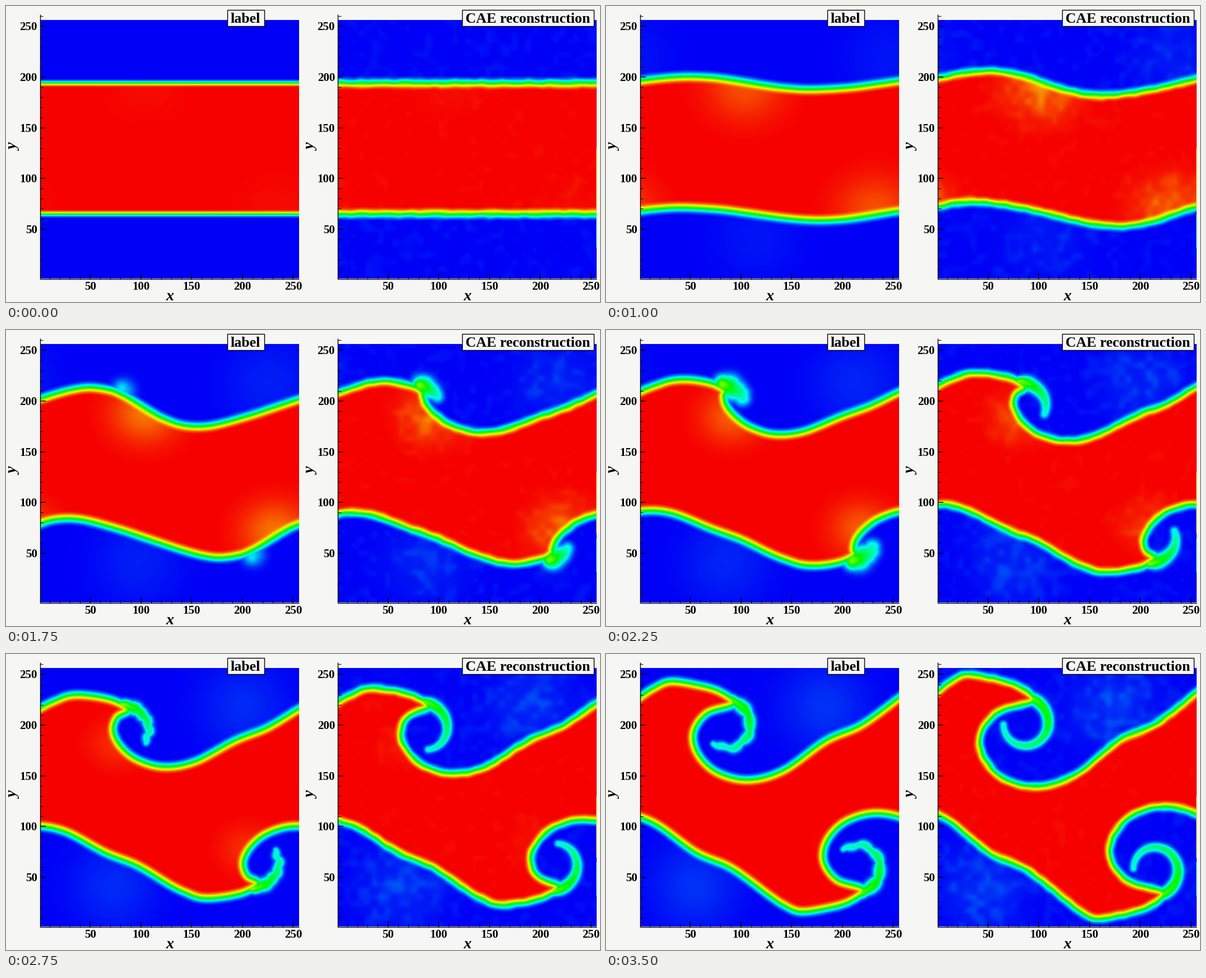
A matplotlib script that plays this animation: 1060x529 px, repeating every 3.75 s.

```python
import numpy as np
import matplotlib.pyplot as plt
from matplotlib.animation import FuncAnimation
from matplotlib.colors import LinearSegmentedColormap
from matplotlib.patches import Rectangle
from matplotlib.path import Path

W, H, DPI = 1060, 529, 100
PT = 72 / DPI
FRAMES, STEP = 15, 250
PAPER = "#f6f6f4"
UNIT = 1.8115                 # pixels per data unit
X0, Y0 = 59.5, 489.3          # pixel position of the data origin
PERIOD = 256 * UNIT
SHIFT = 531.5                 # offset of the right panel
TOP, BOTTOM = 22.0, 489.0     # the lower layer mirrors the upper one in here
NX, NY = 232, 234
ROLL, END = 1750, 3900        # ages at which roll-up begins and ends

F = 0.965
rainbow = LinearSegmentedColormap.from_list(
    "rainbow5", [(0, 0, F), (0, F, F), (0, F, 0), (F, F, 0), (F, 0, 0)], N=512)

gx = (X0 + (np.arange(NX) + 0.5) * PERIOD / NX).astype(np.float32)
gy = (TOP + (np.arange(NY) + 0.5) * (BOTTOM - TOP) / NY).astype(np.float32)
GX, GY = np.meshgrid(gx, gy)
GRID = np.column_stack([GX.ravel(), GY.ravel()])

# Key points on the upper layer: x on the wave, then x and y when rolled up.
KNOTS = np.array([
    (59.5, 59.5, 68), (90, 83, 50), (120, 112, 37), (150, 158, 44),       # crest
    (185, 205, 58), (206, 232, 84),                                       # neck
    (222, 170, 103), (238, 137, 143), (258, 142, 187), (282, 178, 224),   # vortex
    (318, 238, 238), (365, 305, 217), (430, 383, 156), (480, 450, 125)])  # trough, rise


def wave(x, age):
    """Growing sine whose falling side steepens."""
    g = min(age / ROLL, 1) ** 2
    th = 2 * np.pi * (x - X0) / PERIOD
    return 138.6 - 35 * g * np.sin(th + 0.3 + 0.6 * g * np.sin((th - 0.9) / 2) ** 2)


def landmarks(age):
    u = np.clip((age - ROLL) / (END - ROLL), 0, 1)
    start = np.column_stack([KNOTS[:, 0], wave(KNOTS[:, 0], age)])
    return start * (1 - u) + KNOTS[:, 1:] * u


def spline(p, n):
    """Catmull-Rom curve through p[1] .. p[-2]."""
    u = (np.arange(n) / n)[:, None]
    parts = []
    for a, b, c, d in zip(p, p[1:], p[2:], p[3:]):
        parts.append(0.5 * (2 * b + (c - a) * u + (2 * a - 5 * b + 4 * c - d) * u ** 2
                            + (3 * b - a - 3 * c + d) * u ** 3))
    parts.append(p[-2][None])
    return np.vstack(parts)


def seg_dist2(a, b):
    dx, dy = (b - a).astype(np.float32)
    px, py = GX - np.float32(a[0]), GY - np.float32(a[1])
    s = np.clip((px * dx + py * dy) / (dx * dx + dy * dy + 1e-6), 0, 1)
    return (px - s * dx) ** 2 + (py - s * dy) ** 2


def body(p, half, ragged):
    span = np.array([PERIOD, 0])
    line = spline(np.vstack([p[-4:] - span, p, p[:4] + span]), 8)
    d2 = np.full(GX.shape, 1e9, np.float32)
    for a, b in zip(line, line[1:]):
        np.minimum(d2, seg_dist2(a, b), out=d2)
    ring = np.vstack([line, [[line[-1, 0], 800], [line[0, 0], 800]]])
    inside = Path(ring).contains_points(GRID).reshape(GX.shape)
    dist = np.sqrt(d2) * np.where(inside, 1, -1) + ragged
    u = np.clip(dist / half, -1, 1)
    return 0.5 + 0.5 * (1.5 * u - 0.5 * u ** 3)


def tongue(age, wispy):
    """Mixed fluid winding clockwise around the vortex centre."""
    out = np.zeros_like(GX)
    power = np.clip((age - 1600) / 400, 0, 1)
    if power == 0:
        return out
    s = np.linspace(0, 1, 42)
    angle = np.radians(-100 + s * max(0.13 * (age - ROLL), 8))
    radius = 42 + 8 * np.exp(-5 * s) - 5 * s ** 2 + 2.5 * wispy * s * np.sin(27 * s)
    cy = 147 - 0.0135 * (age - 2250)
    line = np.column_stack([215 + radius * np.cos(angle), cy + radius * np.sin(angle)])
    width = 11.5 + 9 * np.clip((2750 - age) / 500, 0, 1)
    for i in range(len(line) - 1):
        r = width * min(1, 0.6 + 3 * s[i]) * (1 - 0.45 * s[i])
        r *= 1 + 0.15 * wispy * np.sin(37 * s[i])
        value = power * (0.64 - 0.36 * s[i] ** 0.7)
        np.maximum(out, value * np.exp(-(seg_dist2(line[i], line[i + 1]) / (r * r)) ** 1.25), out=out)
    return out


def mirror(f):
    return np.roll(f[::-1], NX // 2, axis=1)


def patch(cx, cy, rx, ry):
    dx = (GX - cx + PERIOD / 2) % PERIOD - PERIOD / 2
    return np.exp(-(dx / rx) ** 2 - ((GY - cy) / ry) ** 2)


def mottle(seed, cell):
    """Soft blocky noise around zero."""
    rng = np.random.default_rng(seed)
    n = rng.random((NY // cell + 1, NX // cell + 1)) - 0.5
    n = np.kron(n, np.ones((cell, cell)))[:NY, :NX]
    for axis in (0, 1, 0, 1):
        n = sum(np.roll(n, k, axis) for k in range(-2, 3)) / 5
    return n


def hazes(age, p):
    cx, cy = (p[7] + p[8]) / 2
    size = 68 - 0.01 * age
    warm = 0.12 * np.exp(-((age - 1700) / 1100) ** 2) * patch(cx, cy + 10, size * 1.15, size)
    cool = 0.055 * (age / END) ** 0.7 * patch(500 - 0.044 * (age - 1000), 95, 75, 75)
    return warm, cool


def field(ms, rebuilt):
    if rebuilt:
        age = ms + 380 * min(ms / 400, 1)
        half = 13.5
        grain = mottle(ms + 7, 6)
        ragged = 2.5 * mottle(ms + 3, 6)
    else:
        age = ms
        half = 8 + 6 * min(ms / 1000, 1)
        grain, ragged = 0, 0
    p = landmarks(age)
    top = np.maximum(body(p, half, ragged), tongue(age, not rebuilt))
    phi = top * mirror(top)
    warm, cool = (h + mirror(h) for h in hazes(age, p))
    warm = warm * (1 + grain) + 0.04 * np.clip(grain - 0.12, 0, 1)
    cool = cool * (1 + grain) + 0.05 * np.clip(grain, 0, 1)
    return np.clip(phi * (1 - warm) + (1 - phi) * cool, 0, 1)


FIELDS = [(field(i * STEP, False), field(i * STEP, True)) for i in range(FRAMES)]

plt.rcParams["font.family"] = "Liberation Serif"
fig = plt.figure(figsize=(W / DPI, H / DPI), dpi=DPI, facecolor=PAPER)
ax = fig.add_axes([0, 0, 1, 1])


def text(x, y, s, px, **kw):
    ax.text(x, y, s, fontsize=px * PT, weight="bold", color="black", zorder=6, **kw)


def stroke(xs, ys, width=1.4, color="black", z=4):
    ax.plot(xs, ys, color=color, lw=width * PT, solid_capstyle="butt", zorder=z)


def panel(dx, title, box):
    left, right, base = 60.5 + dx, 522.5 + dx, 487.5
    img = ax.imshow(FIELDS[0][0], cmap=rainbow, vmin=0, vmax=1, interpolation="bilinear",
                    extent=(X0 + dx, X0 + PERIOD + dx, BOTTOM, TOP), zorder=1)
    img.set_clip_path(Rectangle((left, 25), right - left, base - 25, transform=ax.transData))
    stroke([left, left], [15, base + 0.5], 1.4)
    stroke([left, right], [base, base], 1.4)
    for v in range(10, 261, 10):
        major = v % 50 == 0
        size, width = (10, 1.5) if major else (5.5, 1)
        x, y = X0 + dx + v * UNIT, Y0 - v * UNIT
        stroke([left, left + size], [y, y], width)
        if v <= 250:
            stroke([x, x], [base, base - size], width)
        if major:
            text(x, 507, str(v), 21, ha="center", va="baseline")
            text(55.5 + dx, y + 7, str(v), 21, ha="right", va="baseline")
    text(292 + dx, 526, "x", 28, ha="center", va="baseline", style="italic")
    text(14 + dx, 252, "y", 28, ha="center", va="center", style="italic", rotation=90)
    x0, x1 = box
    ax.add_patch(Rectangle((x0, 7), x1 - x0, 28.5, fc=PAPER, ec="black", lw=1.4 * PT, zorder=5))
    text((x0 + x1) / 2, 29.5, title, 26, ha="center", va="baseline")
    return img


images = (panel(0, "label", (394.5, 460.5)),
          panel(SHIFT, "CAE reconstruction", (814, 1048.5)))
stroke([1053.5, 1053.5], [255, 364], 1.5, "#e8e040")
stroke([1053.5, 1053.5], [372, 432], 1.5, "#70e8c0")

ax.set_xlim(0, W)
ax.set_ylim(H, 0)
ax.set_aspect("auto")
ax.axis("off")


def draw(i):
    for img, data in zip(images, FIELDS[i]):
        img.set_data(data)
    return images


anim = FuncAnimation(fig, draw, frames=FRAMES, init_func=lambda: draw(0),
                     interval=STEP, repeat=True, blit=False)
plt.show()
```
